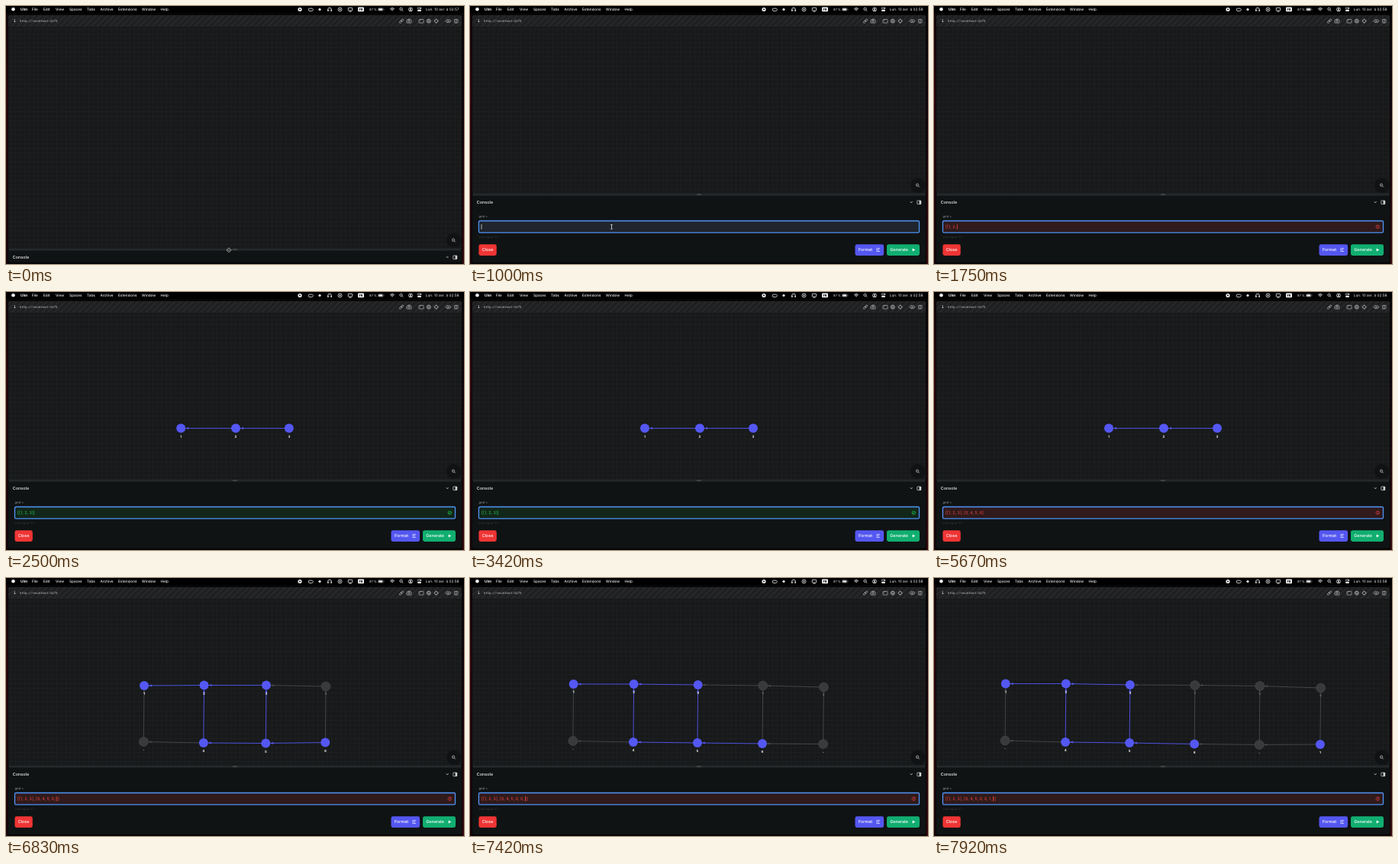
Animation, 600 px wide and 338 px high, one loop 8000 ms. Source, as an HTML page with a canvas:

```html
<!DOCTYPE html>
<html lang="fr">
<head>
<meta charset="utf-8">
<title>Grid console</title>
<style>
html, body { margin: 0; width: 100%; height: 100%; overflow: hidden; background: #000; }
canvas { display: block; width: 600px; height: 338px; }
</style>
</head>
<body>
<canvas id="stage"></canvas>
<script>
const W = 600, H = 338, LOOP = 8000;
const canvas = document.getElementById('stage');
const g = canvas.getContext('2d');
const dpr = window.devicePixelRatio || 1;
canvas.width = W * dpr;
canvas.height = H * dpr;
g.scale(dpr, dpr);
g.textRendering = 'geometricPrecision';

const SANS = 'Inter, "Open Sans", sans-serif';
const MONO = '"DejaVu Sans Mono", "Noto Sans Mono", monospace';
const BLUE = '#5457f2', GREY = '#383a3c';

// ---- drawing helpers ----
function text(s, x, y, size, color, { weight = 400, align = 'left', font = SANS } = {}) {
  g.font = `${weight} ${size}px ${font}`;
  g.textAlign = align;
  g.textBaseline = 'middle';
  g.fillStyle = color;
  g.fillText(s, x, y);
}
function rect(x, y, w, h, color) {
  g.fillStyle = color;
  g.fillRect(x, y, w, h);
}
function box(x, y, w, h, r, fill, stroke, lw = 0.8) {
  g.beginPath();
  g.roundRect(x, y, w, h, r);
  paint(fill, stroke, lw);
}
function dot(x, y, r, fill, stroke, lw = 0.8) {
  g.beginPath();
  g.ellipse(x, y, r, r, 0, 0, Math.PI * 2);
  paint(fill, stroke, lw);
}
function paint(fill, stroke, lw) {
  if (fill) { g.fillStyle = fill; g.fill(); }
  if (stroke) { g.strokeStyle = stroke; g.lineWidth = lw; g.stroke(); }
}
// Polyline from a flat list of coordinates
function line(pts, color, lw = 0.8, fill) {
  g.beginPath();
  for (let i = 0; i < pts.length; i += 2) g.lineTo(pts[i], pts[i + 1]);
  if (fill) g.closePath();
  paint(fill, color, lw);
}
// Part of a circle, angles in units of pi
function curve(x, y, r, a, b, color, lw = 0.8) {
  g.beginPath();
  g.ellipse(x, y, r, r, 0, a * Math.PI, b * Math.PI);
  paint(null, color, lw);
}
function lens(x, y, color) {
  dot(x - 0.5, y - 0.5, 1.6, null, color);
  line([x + 0.7, y + 0.7, x + 2.3, y + 2.3], color);
}
function diamond(x, y, rx, ry, stroke, fill) {
  line([x - rx, y, x, y - ry, x + rx, y, x, y + ry, x - rx, y], stroke, 0.8, fill);
}
const mix = (a, b, k) => a + (b - a) * k;
const smooth = k => k * k * (3 - 2 * k);
// Eased value along [time, value] keys
function track(keys, t) {
  if (t <= keys[0][0]) return keys[0][1];
  for (let i = 1; i < keys.length; i++) {
    const [t0, a] = keys[i - 1], [t1, b] = keys[i];
    if (t < t1) return mix(a, b, smooth((t - t0) / (t1 - t0)));
  }
  return keys[keys.length - 1][1];
}

// ---- typing: each edit sets the text before and after the caret ----
const A = '[[1, 2, 3]', B = A + ', [0, 4, 5, 6';
const edits = [];
// Types s after a given head; when(i) is the time of key i
function type(head, s, when, tail = '') {
  for (let i = 0; i < s.length; i++) {
    edits.push({ at: when(i), head: head + s.slice(0, i + 1), tail });
  }
}
const tailKeys = [6540, 6620, 6960, 7230, 7330, 7430, 7640, 7740];
type('', A + ']', i => 1270 + i * 65);
edits.push({ at: 3780, head: A, tail: '' });
type(A, ', ', i => 4200 + i * 200);
type(A + ', ', '[0, 4, 5, 6]', i => 4570 + i * 53);
type(B + ']', ']', () => 5700);
edits.push({ at: 6300, head: B, tail: ']]' });
type(B, ', 0, 1, ', i => tailKeys[i], ']]');

function parse(s) {
  try { return JSON.parse(s); } catch { return null; }
}

// ---- graph layouts ----
const layouts = [
  { at: 1920, rows: [[1, 2, 3]], x: [229, 301, 371], y: [[178.5, 178.5, 178.5]] },
  { at: 5700, rows: [[1, 2, 3, 0], [0, 4, 5, 6]], x: [181, 259.5, 341, 419],
    y: [[141, 140.5, 140.5, 142], [214.5, 216, 216.5, 215.5]] },
  { at: 6960, rows: [[1, 2, 3, 0, 0], [0, 4, 5, 6, 0]], x: [136, 215, 299, 384, 463],
    y: [[139, 139, 140, 141, 143], [213.5, 215, 216, 217, 217.5]] },
  { at: 7430, rows: [[1, 2, 3, 0, 0, 0], [0, 4, 5, 6, 0, 1]], x: [94, 173, 257, 342, 427, 506.5],
    y: [[138.5, 138.5, 140, 140.5, 141.5, 144], [213, 215, 216, 217.5, 218.5, 218]] }
];

function place(n, r, c) {
  const L = layouts[n];
  if (!L) return [300, 178.5];
  const row = Math.min(r, L.y.length - 1), col = Math.min(c, L.x.length - 1);
  return [L.x[col] - r * 0.7, L.y[row][col]];
}
function edge(a, b, color) {
  const d = Math.hypot(b[0] - a[0], b[1] - a[1]);
  if (d < 12) return;
  line([...a, ...b], color, 0.9);
  const ux = (b[0] - a[0]) / d, uy = (b[1] - a[1]) / d;
  const tx = b[0] - ux * 6, ty = b[1] - uy * 6, bx = tx - ux * 4, by = ty - uy * 4;
  line([tx, ty, bx - uy * 1.5, by + ux * 1.5, bx + uy * 1.5, by - ux * 1.5], null, 0, color);
}
function drawGraph(t) {
  const n = layouts.findLastIndex(L => t >= L.at);
  if (n < 0) return;
  const { at, rows } = layouts[n], u = (t - at) / 1000;
  const k = 1 - Math.exp(-9 * u) * Math.cos(9 * u);
  const pos = rows.map((row, r) => row.map((_, c) => {
    const a = place(n - 1, r, c), b = place(n, r, c);
    return [mix(a[0], b[0], k), mix(a[1], b[1], k)];
  }));
  const link = (r0, c0, r1, c1) =>
    edge(pos[r0][c0], pos[r1][c1], rows[r0][c0] && rows[r1][c1] ? BLUE : '#484a4c');
  rows.forEach((row, r) => row.forEach((_, c) => {
    if (c) link(r, c, r, c - 1);
    if (r) link(r, c, r - 1, c);
  }));
  rows.forEach((row, r) => row.forEach((v, c) => {
    const [x, y] = pos[r][c];
    dot(x, y, 6, v ? BLUE : GREY, v ? null : '#4b4d4f', 0.6);
    text(v || '-', x, y + 11, 4.4, v ? '#f4f4f4' : '#bbb', { weight: 700, align: 'center' });
  }));
}

// ---- screen parts ----
function drawMenu(t) {
  const w = '#f2f2f2';
  rect(0, 0, W, 9, '#000');
  dot(9.5, 4.3, 2.3, w);
  text('Ulm', 19, 4.4, 4.8, w, { weight: 700 });
  [['File', 34], ['Edit', 49], ['View', 65], ['Spaces', 83], ['Tabs', 106], ['Archive', 123.5],
   ['Extensions', 147], ['Window', 178], ['Help', 202.5]]
    .forEach(([s, x]) => text(s, x, 4.4, 4.7, w, { weight: 500 }));

  dot(385, 4.5, 2.6, w);
  dot(385, 4.5, 0.9, '#000');
  curve(398, 4.8, 1.8, 0.5, 1.7, w);
  curve(400.5, 4.8, 1.8, 1.2, 2.5, w);
  line([398, 6.6, 400.5, 6.6], w);
  dot(411, 4.5, 1.6, w);
  curve(424, 4.6, 2.4, 1, 2, w);
  rect(421.2, 4.5, 1.4, 2.5, w);
  rect(425.4, 4.5, 1.4, 2.5, w);
  dot(437.5, 4.5, 2.5, null, w);
  dot(437.5, 4.5, 1, w);
  box(448.3, 2.3, 5.4, 3.8, 0.6, null, w);
  line([449.5, 7.2, 452.5, 7.2], w);
  box(461, 1.6, 8, 5.6, 1, w);
  text('FR', 465, 4.5, 4, '#000', { weight: 700, align: 'center' });
  text('87 %', 476, 4.5, 4, w);
  box(487.5, 2.7, 6.6, 3.6, 0.8, null, '#999', 0.5);
  rect(488.2, 3.3, 5, 2.4, w);
  rect(494.7, 3.8, 0.6, 1.4, '#aaa');
  [1.2, 2.6, 4].forEach(r => curve(506, 6.6, r, 1.25, 1.75, w));
  lens(518, 4.4, w);
  dot(530, 4.5, 2.5, null, w);
  dot(530, 3.9, 0.9, w);
  curve(530, 6.7, 1.4, 1, 2, w);
  box(539, 2, 5, 2, 1, null, w, 0.6);
  box(539, 5, 5, 2, 1, w);
  dot(543, 3, 0.8, w);
  text(t < 600 ? 'Lun. 10 avr. à 02:57' : 'Lun. 10 avr. à 02:58', 593.5, 4.4, 4.75, w, { align: 'right' });
}

function drawToolbar() {
  const c = '#b9baba';
  rect(3, 12, 594, 15, '#1e1f20');
  g.save();
  g.beginPath();
  g.rect(3, 12, 594, 15);
  g.clip();
  for (let x = -10; x < 610; x += 8) line([x, 28, x + 17, 11], '#262728', 2.8);
  g.restore();
  text('i', 11.5, 20, 4.6, '#ddd', { weight: 700, align: 'center', font: MONO });
  text('http://localhost:5173', 18, 19.9, 3.92, '#d2d2d2', { font: MONO });

  g.save();
  g.translate(518, 19.7);
  g.rotate(-Math.PI / 4);
  box(-3.2, -1.1, 3.6, 2.2, 1.1, null, c, 0.7);
  box(-0.4, -1.1, 3.6, 2.2, 1.1, null, c, 0.7);
  g.restore();
  box(525, 18, 6, 4.2, 0.8, null, c, 0.7);
  line([526.8, 18, 527.2, 17.1, 528.8, 17.1, 529.2, 18], c, 0.7);
  dot(528, 20.1, 1.1, null, c, 0.7);
  box(541, 17.5, 6, 4.6, 0.8, null, c, 0.7);
  line([541.8, 18.9, 543.2, 18.9], c, 0.6);
  dot(553.8, 19.7, 2.4, null, c, 0.9);
  dot(553.8, 19.7, 1, null, c, 0.7);
  dot(563.6, 19.7, 2.1, null, c, 0.7);
  [[0, 1], [0, -1], [1, 0], [-1, 0]].forEach(([x, y]) =>
    line([563.6 + x * 1.4, 19.7 + y * 1.4, 563.6 + x * 3, 19.7 + y * 3], c, 0.7));
  diamond(578.2, 19.7, 2.3, 2.3, c);
  diamond(580.6, 19.7, 2.3, 2.3, c);
  box(587.4, 17.5, 4.6, 4.6, 0.6, null, c, 0.7);
  line([589.7, 17.5, 589.7, 22.1], c, 0.7);
}

function drawGrid() {
  rect(3, 12, 594, 324, '#17191a');
  for (let x = 6; x < 597; x += 6) rect(x, 27, 0.5, 309, '#202324');
  for (let y = 30; y < 336; y += 6) rect(3, y, 594, 0.5, '#202324');
}

function drawInput(t, y) {
  const edit = edits.findLast(e => t >= e.at) || { at: 900, head: '', tail: '' };
  const value = edit.head + edit.tail;
  const valid = parse(value);
  const color = valid ? '#25d04a' : '#f2463f';
  const focused = t >= 900;
  box(11.5, y - 7.7, 577, 15.4, 1.6, !value ? '#20252d' : valid ? '#12271a' : '#301a1c',
    focused ? '#4f94f8' : '#343a42', focused ? 1.3 : 0.8);
  text(value, 15, y + 0.2, 5.4, color);
  if (focused && (t - edit.at) % 600 < 300) {
    g.font = `400 5.4px ${SANS}`;
    rect(15 + g.measureText(edit.head).width - 0.3, y - 3.3, 0.7, 6.6, value ? color : '#eee');
  }
  if (!value) return;
  dot(581.3, y, 2.2, null, color, 0.7);
  if (valid) line([580.2, y, 581, y + 0.9, 582.5, y - 0.8], color, 0.7);
  else {
    rect(581, y - 1.3, 0.7, 1.6, color);
    rect(581, y + 0.7, 0.7, 0.6, color);
  }
}

function drawButton(x, w, y, color, label, tx) {
  box(x, y - 7.3, w, 14.6, 2.4, color);
  text(label, tx, y + 0.2, 5.4, '#fff', { weight: 500 });
}

function drawPanel(t, y) {
  dot(586.8, y - 12, 9.8, '#101213');
  lens(586.5, y - 12, '#c8c8c8');
  rect(3, y, 594, H, '#101314');
  rect(4, y - 1.5, 592, 3, '#25282a');
  for (let i = -1; i < 2; i++) rect(299.2 + i * 2, y - 0.4, 1.4, 0.8, '#85888a');

  text('Console', 8.8, y + 10.4, 5.45, '#f0f0f0', { weight: 500 });
  const v = y < 300 ? 0.8 : 0;
  line([576.8, y + 10 - v, 578.2, y + 10 + v, 579.6, y + 10 - v], '#ddd');
  box(585.8, y + 8, 5, 4.6, 0.6, null, '#ddd', 0.7);
  rect(588.6, y + 8, 2.2, 4.6, '#ddd');

  text('grid =', 11.6, y + 29.2, 4, '#a3a5a6');
  drawInput(t, y + 42.2);
  text('Line input: 1:1', 11.6, y + 55.4, 4, '#3a3d3f');

  const by = y + 72.6;
  drawButton(11.5, 23.3, by, '#f03535', 'Close', 15.8);
  drawButton(504.5, 37.6, by, '#5457f0', 'Format', 509);
  for (let i = -1; i < 2; i++) rect(532.3, by + i * 1.9 - 0.3, i ? 4.6 : 3.6, 0.7, '#fff');
  drawButton(546, 43, by, '#11ae70', 'Generate', 550.3);
  line([579.7, by - 2, 583.2, by, 579.7, by + 2], null, 0, '#fff');
}

function drawCursor(t, y) {
  if (t > 1260) return;
  const cx = track([[790, 292], [930, 185.5]], t);
  const cy = t < 790 ? y + 0.8 : track([[790, 247.8], [930, 289.3]], t);
  if (t < 820) {
    diamond(cx, cy, 3, 3, '#d5d5d5', '#111');
    line([cx - 1.6, cy, cx + 1.6, cy], '#d5d5d5', 0.7);
  } else {
    line([cx, cy - 2.6, cx, cy + 2.6], '#eee', 0.8);
    for (const d of [-1, 1]) line([cx - 1.3, cy + d * 2.8, cx + 1.3, cy + d * 2.8], '#eee', 0.7);
  }
}

function drawBackdrop() {
  rect(0, 0, W, H, '#060606');
  const left = g.createLinearGradient(0, 9, 0, H);
  left.addColorStop(0, '#12060a');
  left.addColorStop(0.3, '#35070f');
  left.addColorStop(1, '#1c050b');
  rect(0, 9, 2, H, left);
  const right = g.createLinearGradient(0, 9, 0, H);
  right.addColorStop(0, '#0a0506');
  right.addColorStop(0.5, '#16060a');
  right.addColorStop(1, '#3a0a10');
  rect(598, 9, 2, H, right);
}

function draw(t) {
  const y = track([[80, 319], [170, 316], [420, 316], [780, 247]], t);
  drawBackdrop();
  g.save();
  g.beginPath();
  g.roundRect(3, 12, 594, 323.5, 3);
  g.clip();
  drawGrid();
  drawGraph(t);
  drawToolbar();
  drawPanel(t, y);
  g.restore();
  drawMenu(t);
  drawCursor(t, y);
}

const start = performance.now();
function tick() {
  draw((performance.now() - start) % LOOP);
  requestAnimationFrame(tick);
}
tick();
</script>
</body>
</html>
```
